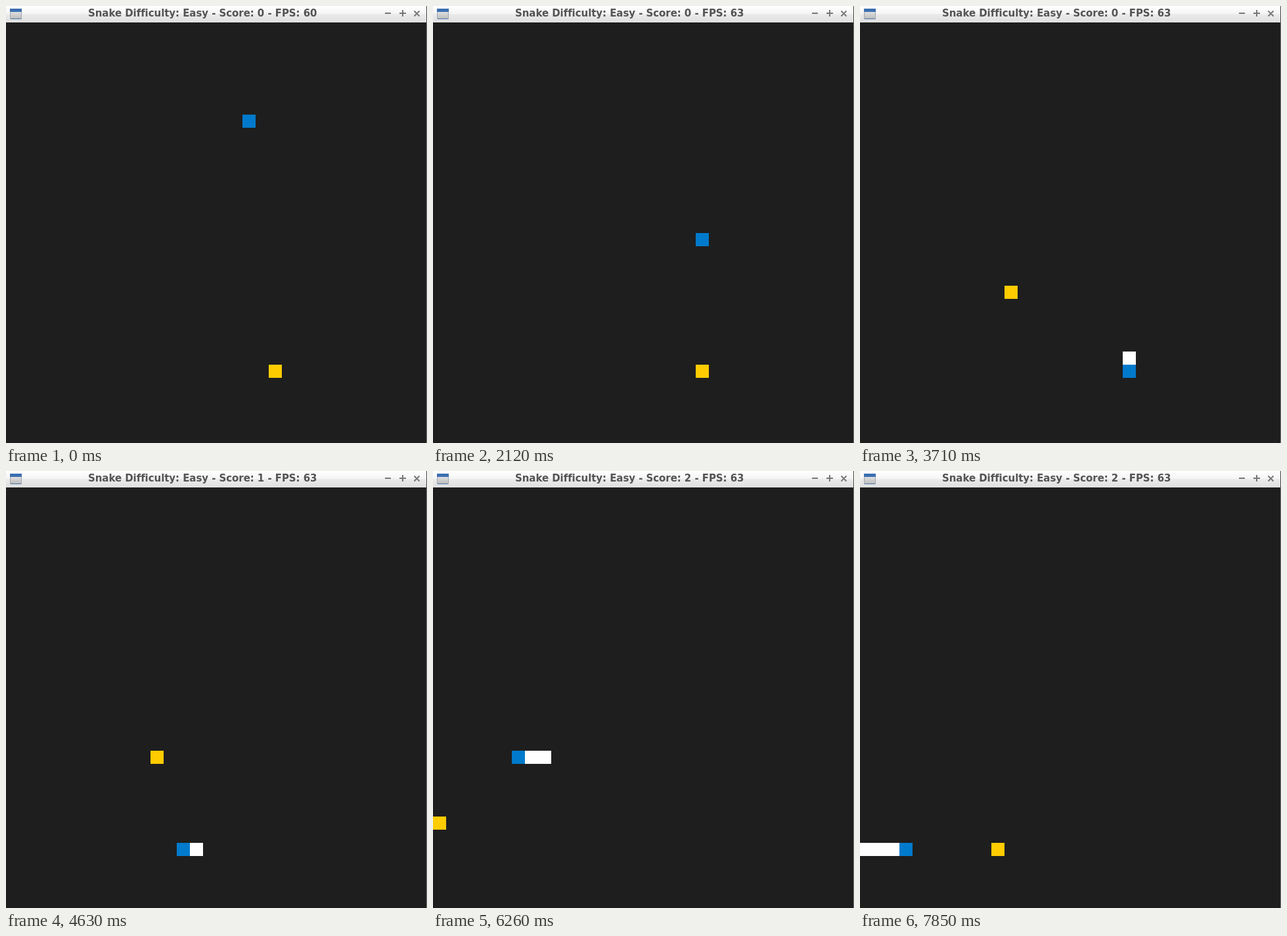
These frames come from a looping animation (641x664 px, 8000 ms). An HTML page:

```html
<!DOCTYPE html>
<html lang="en">
<head>
<meta charset="utf-8">
<title>Snake</title>
<style>
  html, body { margin: 0; width: 100%; height: 100%; overflow: hidden; background: #1e1e1e; }
  svg { display: block; }
  text { font: bold 15px "DejaVu Sans", sans-serif; letter-spacing: -.06px; fill: #545454; }
</style>
</head>
<body>
<svg width="641" height="664" viewBox="0 0 641 664">
  <defs>
    <linearGradient id="bar" x2="0" y2="1">
      <stop offset="0" stop-color="#fff"/>
      <stop offset=".48" stop-color="#f4f4f4"/>
      <stop offset=".5" stop-color="#ebebeb"/>
      <stop offset="1" stop-color="#dfdfdf"/>
    </linearGradient>
    <linearGradient id="pane" x2="0" y2="1">
      <stop offset="0" stop-color="#eee"/>
      <stop offset="1" stop-color="#bcbcbc"/>
    </linearGradient>
  </defs>
  <rect width="641" height="664" fill="#1e1e1e"/>
  <g id="board" shape-rendering="crispEdges"></g>
  <rect width="640" height="25" fill="url(#bar)"/>
  <path d="M640.5 0V25" stroke="#444"/>
  <path d="M640.5 25V664" stroke="#707070"/>
  <rect x="6.5" y="4.5" width="17" height="15" fill="url(#pane)" stroke="#a0a8b4"/>
  <path d="M6 4H24V9H6Z" fill="#3c6fb0"/>
  <path d="M7 19.5H23" stroke="#4a74a8"/>
  <path d="M577 11H586M599 11H609M604 6V16M621.5 7.5L629.5 15.5M629.5 7.5L621.5 15.5"
        stroke="#777" stroke-width="2"/>
  <text id="title" x="125" y="16"></text>
</svg>
<script>
const LOOP = 8000, CELL = 20, TOP = 25;
const FIRST_MOVE = 125, FIRST_REFRESH = 260, REFRESH = 1000;
const delays = [160, 123, 104, 89];  // ms per move, by score
const foods = [[20, 26], [11, 20], [0, 25], [10, 27]];
const turns = 'R3 D8 L1 D12 L8 U7 L12 D7 R3';
const dirs = { R: [1, 0], L: [-1, 0], U: [0, -1], D: [0, 1] };
const board = document.getElementById('board');
const title = document.getElementById('title');

// Play the game once: every move records when it happens, where the head is and the score.
const moves = [{ time: 0, head: [18, 7], score: 0 }];
let next = FIRST_MOVE;
for (const run of turns.split(' ')) {
  const [dx, dy] = dirs[run[0]];
  for (let i = 0; i < +run.slice(1); i++) {
    const { head, score } = moves[moves.length - 1];
    const [x, y] = [head[0] + dx, head[1] + dy];
    const [fx, fy] = foods[score];
    const now = score + (x === fx && y === fy);
    moves.push({ time: next, head: [x, y], score: now });
    next += delays[now];
  }
}

const lastMove = t => moves.filter(m => m.time <= t).length - 1;

const block = ([x, y], color) =>
  `<rect x="${x * CELL}" y="${TOP + y * CELL}" width="${CELL}" height="${CELL}" fill="${color}"/>`;

function draw(t) {
  const n = lastMove(t);
  const { head, score } = moves[n];
  board.innerHTML = block(foods[score], '#ffcc00') +
    moves.slice(n - score, n).map(m => block(m.head, '#fff')).join('') +
    block(head, '#007acc');

  // The caption refreshes once a second, so it lags behind the board.
  const refreshes = Math.floor((t - FIRST_REFRESH) / REFRESH);
  const seen = Math.max(0, FIRST_REFRESH + refreshes * REFRESH);
  const caption = `Snake Difficulty: Easy - Score: ${moves[lastMove(seen)].score}` +
    ` - FPS: ${refreshes < 0 ? 60 : 63}`;
  if (title.textContent !== caption) title.textContent = caption;
}

const began = performance.now();
function tick() {
  draw((performance.now() - began) % LOOP);
  requestAnimationFrame(tick);
}
tick();
</script>
</body>
</html>
```
